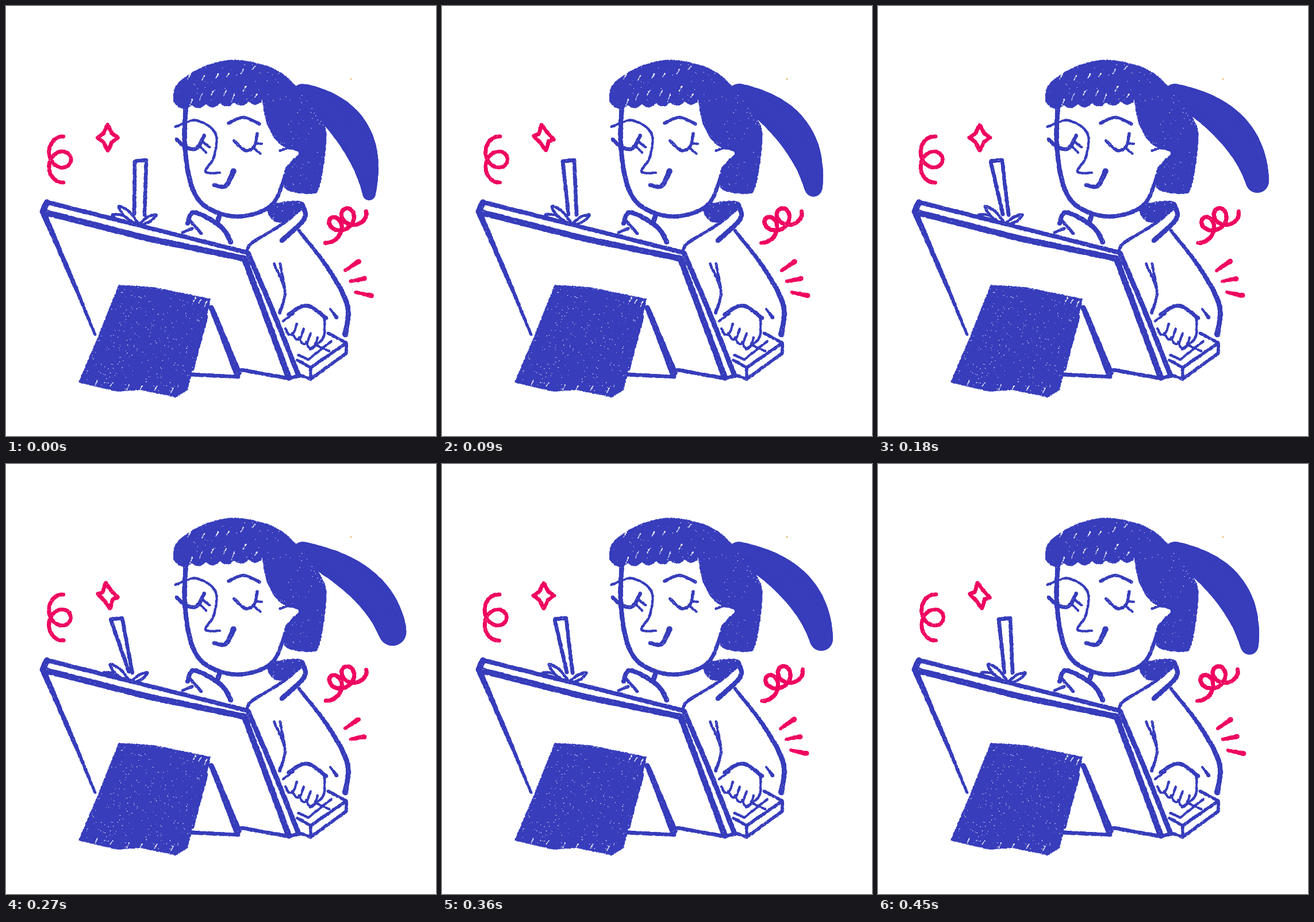
Animation of 748 by 748 pixels, one loop 0.54 s. Source, as an HTML page with a canvas:

```html
<!DOCTYPE html>
<html lang="en">
<head>
<meta charset="utf-8">
<title>Drawing on a tablet</title>
<style>
html, body { margin: 0; width: 100%; height: 100%; overflow: hidden; background: #fff; }
canvas { display: block; width: 100vw; height: 100vh; }
</style>
</head>
<body>
<canvas id="stage" width="748" height="748"></canvas>
<script>
const ctx = document.getElementById('stage').getContext('2d');
const BLUE = '#373dbb', PINK = '#ee0560', WHITE = '#fff';
const HOLD = 90, LAST = 3;

let seed = 1;
const rand = () => (seed = seed * 16807 % 2147483647) / 2147483647;
const jitter = r => (rand() - .5) * 2 * r;
const mix = (a, b, t) => a + (b - a) * t;
const rad = degrees => degrees * Math.PI / 180;
const polar = (x, y, r, degrees) =>
  [x + r * Math.cos(rad(degrees)), y + r * Math.sin(rad(degrees))];
const points = text => text.trim().split(/\s+/).map(q => q.split(',').map(Number));
const sample = (n, f) => Array.from({ length: n + 1 }, (_, i) => f(i / n));

// Smooth curve through the points (bend 1) or straight pieces (bend 0)
function trace(p, closed = false, bend = 1) {
  const n = p.length, out = [];
  const at = i => closed ? p[(i + n) % n] : p[Math.max(0, Math.min(n - 1, i))];
  for (let i = 0; i < (closed ? n : n - 1); i++) {
    const [a, b, c, d] = [at(i - 1), at(i), at(i + 1), at(i + 2)];
    const steps = Math.max(2, Math.ceil(Math.hypot(c[0] - b[0], c[1] - b[1]) / 1.2));
    for (let s = 0; s < steps; s++) {
      const t = s / steps, u = bend ? t * t * (3 - 2 * t) : t, v = t * (1 - t) * bend / 2;
      out.push([0, 1].map(k => mix(b[k], c[k], u)
        + v * ((1 - t) * (c[k] - a[k]) - t * (d[k] - b[k]))));
    }
  }
  if (!closed) out.push(p[n - 1]);
  return out;
}

function dot(x, y, r, color) {
  ctx.fillStyle = color;
  ctx.beginPath();
  ctx.arc(x, y, r, 0, 7);
  ctx.fill();
}

// Crayon line, width w0 to w1
function stroke(p, w0, w1 = w0, color = BLUE, closed = false, bend = 1) {
  const line = trace(p, closed, bend);
  const radius = i => mix(w0, w1, i / (line.length - 1)) / 2;
  line.forEach(([x, y], i) =>
    dot(x + jitter(.5), y + jitter(.5), Math.max(.6, radius(i) + jitter(.5)), color));
  line.forEach(([x, y], i) => {
    const r = radius(i);
    if (r > 2 && rand() < .07) dot(x + jitter(r), y + jitter(r), .5, WHITE);
  });
}

// Several lines in one text; "|" lifts the crayon
const draw = (text, w0, w1, bend = 1) =>
  text.split('|').forEach(part => stroke(points(part), w0, w1, BLUE, false, bend));

// Filled shape with a rough rim and some bare paper grains
function fill(p, color = BLUE, grains = 0, bend = 1) {
  const rim = trace(p, true, bend);
  const xs = rim.map(q => q[0]), ys = rim.map(q => q[1]);
  ctx.save();
  ctx.beginPath();
  rim.forEach(([x, y]) => ctx.lineTo(x + jitter(.8), y + jitter(.8)));
  ctx.closePath();
  ctx.fillStyle = color;
  ctx.fill();
  ctx.clip();
  while (grains-- > 0)
    dot(mix(Math.min(...xs), Math.max(...xs), rand()),
        mix(Math.min(...ys), Math.max(...ys), rand()), .4 + rand() * .4, WHITE);
  ctx.restore();
}

// Row of short slanted gaps in a filled area
function gaps(n, x0, y0, x1, y1, spread) {
  for (let i = 0; i < n; i++) {
    const x = mix(x0, x1, i / (n - 1)) + jitter(3), y = mix(y0, y1, i / (n - 1)) + jitter(spread);
    stroke([[x, y], [x - 4, y + 8 + jitter(3)]], 2, 1, WHITE);
  }
}

// The tail swings up five degrees per pose and its tip gets blunter
function tail(pose) {
  const tip = polar(520, 155, 205, 57 - 5 * pose), knee = [629 + 6 * pose, 198];
  sample(150, t => {
    const [x, y] = [515, 152].map((root, k) =>
      mix(mix(root, knee[k], t), mix(knee[k], tip[k], t), t));
    const r = mix(17, 11 + 4.5 * pose, t) + (16 - 2.5 * pose) * Math.sin(Math.PI * t);
    dot(x, y, r + jitter(.5), BLUE);
  });
}

function finger(x, y, length, degrees) {
  const leaf = [[0, 0], [.6, 9], [1, 0], [.6, -9]].map(([part, turn]) =>
    polar(x, y, length * part, degrees + turn * 1.3));
  fill(leaf, WHITE);
  stroke(leaf, 4.5, 4.5, BLUE, true);
}

// Pen leans to the left, the hand slides along with it
function pen(pose) {
  const top = 234 - 14 * pose, foot = 232 - 5 * pose, half = 9 - 2 * pose;
  const palm = 230 - 5 * pose;
  finger(palm, 380, 48, 200);
  finger(palm, 380, 46, 223);
  const barrel = [[foot - half, 362], [top - 10, 270], [top + 10, 268], [foot + half, 364]];
  fill(barrel, WHITE, 0, 0);
  stroke(barrel, 6, 6, BLUE, false, 0);
  finger(palm, 382, 36, -31);
}

function doodles(pose) {
  const wobble = Math.sin(pose * 2);
  stroke(sample(40, t => {
    const a = rad(-70 - 580 * t);
    return [94 + wobble + 19 * Math.cos(a), 246 + 42 * t + 20 * Math.sin(a)];
  }), 6, 6, PINK);

  stroke(sample(50, t => {
    const a = rad(mix(-25, 830, t));
    return [612 - wobble - 51 * t + 16 * Math.cos(a), 364 + 33 * t * t + 16 * Math.sin(a)];
  }), 6.5, 6.5, PINK);

  const tilt = pose % 2 ? -10 : 0;
  stroke(sample(7, t => {
    const i = Math.round(t * 7), r = i % 2 ? 10.5 : i % 4 ? 23 : 18;
    return polar(177, 229, r, i * 45 - tilt * (i % 4 ? -1 : 1));
  }), 6, 6, PINK, true, 0);

  for (let i = 0; i < (pose === LAST ? 2 : 3); i++) {
    const x = 590 + 9 * i + wobble, y = 460 + 19 * i;
    stroke([[x, y], polar(x, y, 28 - 3 * i % 6, 23 * i - 34)], 5, 8, PINK);
  }
}

function head() {
  const fringe = sample(48, t =>
    [mix(447, 298, t), mix(165, 174, t) + 6 * Math.abs(Math.sin(t * Math.PI * 6))]);
  fill([...points('291,162 300,133 350,103 405,94 470,111 515,151 553,205 556,250 545,315 530,327 485,317 492,280 485,243 464,222'),
    ...fringe], BLUE, 260);
  gaps(6, 322, 122, 436, 108, 4);
  gaps(7, 322, 158, 438, 146, 8);
  draw('449,166 455,200 469,228 486,243 505,244', 5);

  const ear = points('477,252 492,247 508,251 511,259 501,268 491,279');
  fill([...ear, [474, 276]], WHITE);
  stroke(ear, 4);
  draw('313,172 311,240 323,314 352,352 408,366 464,344 490,281', 8, 6);
  draw('295,210 331,199 364,221 362,262 347,288 372,290', 4);
  draw('296,231 314,246 332,247 345,225', 6);
  draw('387,204 413,194 441,205', 5);
  draw('396,234 416,251 432,244 437,222', 5);
  draw('336,243 348,255 | 343,237 355,246 | 429,246 443,257 | 437,239 445,240', 4);
  draw('361,311 382,313 396,287', 6, 9);
}

function body() {
  fill(points('455,351 485,340 518,343 490,373 466,374'), BLUE, 25);
  draw('371,366 367,378', 8);
  draw('515,345 519,370 480,408 | 316,378 328,359 374,384 391,411', 7, 8);
  draw('514,352 478,381 428,412 419,427 | 318,371 340,396 | 307,394 324,387', 5);
  draw('510,391 562,459 594,522 590,572', 5, 9);
  draw('466,448 485,495 476,534 | 477,448 484,489', 4, 5);
}

function typingHand() {
  draw('491,537 523,521 557,543', 6);
  draw('564,527 575,542', 3, 6);
  draw('482,548 500,535 | 529,597 552,576 554,541', 4);
  for (let i = 0; i < 4; i++) {
    const x = 492 + 12 * i, y = 571 + 8 * i;
    stroke([[x - 6, y - 10], [x, y], [x + 8, y - 2], [x + 14, y - 18]], 4);
  }
  draw('560,569 592,586 592,604 530,649 508,641 | 592,586 530,629 507,616 | 530,629 530,648', 5, 5, 0);
  draw('508,607 526,615 566,583 | 539,590 563,601', 4, 4, 0);
}

function tablet() {
  fill(points('70,341 420,429 508,643 492,648 410,634 322,643 155,572 62,360'), WHITE, 0, 0);
  draw('70,341 420,429', 7);
  draw('71,341 64,358 245,404 412,439', 10, 10, 0);
  draw('66,362 122,492 155,572', 10, 4);
  draw('421,430 463,528 509,643', 8);
  draw('414,438 462,566 492,647', 10);
  draw('510,643 492,648 410,633 | 322,641 404,645', 6, 6, 0);
  draw('357,524 403,638', 8, 13);
  draw('349,540 324,632', 5);
  fill(points('196,485 255,489 356,509 352,530 324,634 316,668 296,681 234,668 195,671 126,655 160,575'), BLUE, 420, 0);
  gaps(6, 162, 652, 290, 666, 2);
  gaps(3, 328, 507, 350, 514, 1);
}

function paint(pose) {
  seed = 77 + pose;
  ctx.fillStyle = WHITE;
  ctx.fillRect(0, 0, 748, 748);
  tail(pose);
  pen(pose);
  doodles(pose);

  // Same seed each time keeps the grain of the still parts fixed
  seed = 4242;
  body();
  head();
  tablet();
  typingHand();
  dot(600, 127, 1.2, '#d9a441');
}

let shown = -1;
function tick() {
  const step = Math.floor(performance.now() / HOLD) % (2 * LAST);
  const pose = LAST - Math.abs(LAST - step);
  if (pose !== shown) paint(shown = pose);
  requestAnimationFrame(tick);
}
tick();
</script>
</body>
</html>
```
